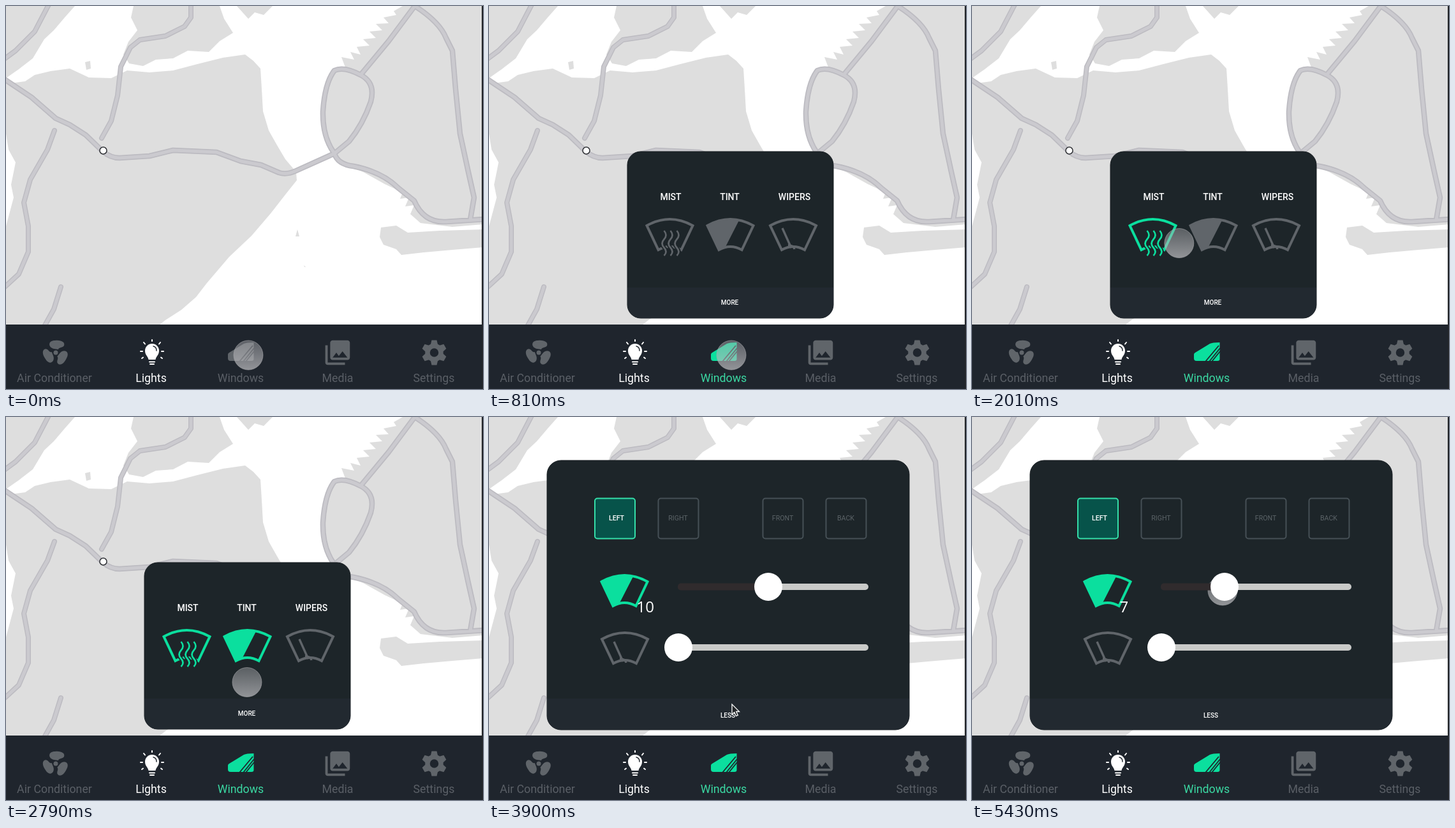
Recreate the animation shown at these times as an HTML page. Size 748 by 600 pixels, loop 5.46 s.

```html
<!DOCTYPE html>
<html lang="en">
<head>
<meta charset="utf-8">
<title>Car controls</title>
<style>
  html, body { margin: 0; width: 100%; height: 100%; overflow: hidden; background: #fff; }
  svg { display: block; width: 748px; height: 600px; font-family: Roboto, sans-serif; }
  text { text-anchor: middle; fill: #fff; }
  .line { fill: none; stroke: currentColor; stroke-width: 4; }
  .icon { color: #60656a; fill: currentColor; }
  .icon.on { color: #0bdf9e; }
  .nav text { font-size: 17.8px; fill: #5a5f66; }
  .nav .lit { fill: #fff; }
  .nav .on + text { fill: #3bd9a3; }
  .card { fill: #1d2529; stroke: #161c20; }
  .foot { fill: #222930; }
  .title { font-size: 14px; font-weight: 500; }
  .small { font-size: 10px; font-weight: 500; }
  .key text { font-size: 10.6px; fill: #5c6468; }
  .key rect { fill: none; stroke: #465056; stroke-width: 2; }
  .key.lit text { fill: #fff; font-weight: 500; }
  .key.lit rect { fill: #07534a; stroke: #35dfa9; }
  .street { fill: none; stroke: #fff; stroke-width: 2.6; stroke-linejoin: round; }
  .road { fill: none; stroke-linejoin: round; stroke-linecap: round; }
</style>
</head>
<body>
<svg viewBox="0 0 748 600">
  <defs>
    <g id="land">
      <path d="M0,0H108L92,18 75,38 60,52 42,82 20,99 0,113Z"/>
      <path d="M0,122L30,118 45,108 70,102 100,98 130,112 165,113 190,101 225,104 262,101 300,91 340,81 375,76 388,86 399,98 401,130 403,165 412,195 425,218 438,240 455,260 456,273 440,293 415,325 385,360 350,393 315,434 298,456 275,476 250,492 240,500H0V345L12,300 8,280 15,245 4,225 0,200Z"/>
      <path d="M200,0H335L342,20 356,42 335,55 318,72 285,70 262,82 235,84 215,94 193,90 184,76 192,56 206,38 196,18Z"/>
      <path d="M362,0H418L404,14 390,10 380,20Z"/>
      <path d="M748,0H622L608,8 612,14 592,18 600,27 580,28 590,38 570,40 580,50 560,52 570,62 550,64 556,76 540,72 546,84 526,80 532,96 512,102 499,128 494,165 499,205 512,230 528,248 560,260 594,279 622,292 618,302 632,300 626,314 640,312 634,326 650,340 700,346 748,342Z"/>
      <path d="M588,347L612,344 630,355 680,352 748,350V378L700,382 655,386 620,390 612,381 592,374 586,362Z"/>
      <path d="M457,350l3,11h-6zM467,406l3,3h-2zM124,88l8,-2 1,12 -7,2z"/>
    </g>
    <clipPath id="shore"><use href="#land"/></clipPath>
    <clipPath id="east"><path d="M560,104L630,14 748,0V332L690,332 655,322 640,300 610,278 548,246 530,230 565,180 578,135Z"/></clipPath>
    <clipPath id="loop"><path d="M515,226Q490,180 500,130L515,102 548,108 572,125 568,160 540,205Z"/></clipPath>

    <path id="glass" class="line" d="M-36,-14Q0,-34 36,-14L18,24Q0,14 -18,24Z"/>
    <g id="tint"><use href="#glass"/><path d="M-36,-14Q-12,-28 14,-23L-7,18 -18,24Z"/></g>
    <g id="wiper"><use href="#glass"/><path class="line" style="stroke-width:3.4" d="M-17,-10L-3,21M-8,17Q1,17 2,23"/></g>
    <path id="steam" d="M-9,-6q6,7 0,13.5t0,13 0,12.5m10,-39q6,7 0,13.5t0,13 0,12.5m10,-39q6,7 0,13.5t0,13 0,12.5"/>
    <g id="mist"><use href="#glass"/><use href="#steam" fill="none" stroke="#1d2529" stroke-width="6"/><use href="#steam" fill="none" stroke="currentColor" stroke-width="2.6"/></g>
    <path id="blade" d="M-3,-6C-12,-8 -13,-19 -1,-19C9,-20 15,-16 13,-11C11,-7 5,-9 4,-5Z"/>
    <path id="tooth" d="M-6,-11L-4,-19.5H4L6,-11Z"/>
    <linearGradient id="shade" x2="0" y2="1">
      <stop stop-color="#b0b0b4" stop-opacity=".42"/><stop offset="1" stop-color="#c0c0c3" stop-opacity=".72"/>
    </linearGradient>
  </defs>

  <!-- map -->
  <rect width="748" height="500" fill="#fff"/>
  <use href="#land" fill="#dedede"/>
  <g clip-path="url(#shore)">
    <path fill="#d3d3d5" d="M345,100l25,-8 12,14 -18,12zM225,20l40,-12 8,18 -40,12zM300,40l30,-10 20,14 -36,12zM195,365l22,-8 -3,8zM240,365l25,-20 5,10 -22,15z"/>
    <g class="street" stroke-width="5">
      <path d="M0,205L16,232 8,270 14,300 0,330M78,290L70,305 62,312 72,325 60,338 74,352 62,372 48,380 55,392 28,408 0,412" style="stroke-width:5"/>
      <path d="M0,30L35,14 60,0M0,55L40,40 65,12M18,0L30,28 35,65M210,20L240,40M230,0L245,30 275,22"/>
    </g>
    <g class="street">
      <path d="M70,104L64,118 45,128M165,114L185,125 225,135 265,120 300,108 345,118 388,130M168,160L215,175 255,160 295,150 340,160 385,142M175,190L215,200 255,195 300,205 345,195 380,183 402,200M100,120L106,150 100,182M130,112L126,150 138,175M60,125L95,150 160,158"/>
      <path d="M205,104L190,150 188,232M225,103L215,150 205,234M262,100L268,140 250,165 255,226M285,95L282,150 278,225M300,88L305,130 295,180 300,226M330,82L325,125 340,160 318,200 322,227M375,88L386,110 365,130 345,118 350,150 362,180 365,243M388,110L382,150 380,183 395,220 420,252"/>
      <path d="M205,118L300,122M190,142L250,148 325,138M195,175L235,182 295,180 360,178M195,210L250,212 320,215 385,220M235,105L228,130M246,163L232,228M340,160L345,195 335,228M265,165L268,196M320,105L355,103 384,96M360,205L400,232 440,242M322,150l14,-6 -4,18 -14,8Z"/>
      <path d="M105,190L100,235 112,262M45,250L100,246 148,236M70,225L100,235M188,238L190,282M215,238L218,275M245,232L240,278M188,254L250,250M188,268L245,266M150,235L142,270 100,302 94,430M142,270L155,300 190,290 240,278 285,265 325,250 365,243M155,300L150,325 170,345 190,325 205,300 190,290"/>
      <path d="M100,332L150,350 170,383 240,375 228,330 240,278M170,383L150,420 95,430M285,265L292,305 280,345 240,375M325,250L310,270 288,280M325,250L350,275 310,318 270,350 240,378 218,412 220,440M70,250L100,302M0,255L40,262 95,248M45,300L78,278 120,285"/>
      <path d="M368,244L375,275 400,270 420,285 438,272M345,242L350,275 375,290 402,310M375,275L362,300 385,315M385,250L390,275M405,252L412,275 440,265M375,290L400,285 425,296M365,260L395,262 430,268M335,262L365,265"/>
      <path d="M436,287L375,338 330,385 285,430 215,490M405,292L350,340 300,390 250,435 195,475M292,305L345,340 385,356M310,318L300,345 340,385M270,350L320,392M280,340L335,375M240,378L300,425M220,410L285,452M250,385L225,425 262,465M350,340L320,320M300,390L275,370"/>
      <path d="M94,430L115,380 155,350M115,380L150,420 160,465 200,500M95,430L60,405 25,418 0,438M95,430L110,460 118,500M95,430L55,440 20,470 0,485M0,455L30,480 35,500M55,440L75,475 110,460 160,465M25,418L55,440M150,420L200,430 250,435M170,383L195,410 220,410M160,465L140,500M200,430L195,475 240,500"/>
      <path d="M615,362L748,352M615,376L748,368M630,358V376M655,357V375M680,356V372M705,352V370M728,350V368"/>
      <path id="loopGrid" clip-path="url(#loop)"/>
      <path id="eastGrid" clip-path="url(#east)"/>
      <path d="M654,20L600,120 548,228M640,60L700,110 748,165M575,150L640,205 722,245M560,245L650,150 748,45M640,300L690,200 745,110M668,332L690,245 660,155" style="stroke-width:3.4"/>
    </g>
  </g>
  <path id="highway" class="road" stroke="#bcbbc1" stroke-width="8.5" d="M-5,113L40,143 78,176 100,186 125,202 152,228Q164,238 178,238L225,235 262,226 330,229 368,243 400,249 428,261Q440,265 455,258L515,231Q496,205 497,165Q500,120 515,101Q530,94 556,108Q580,120 572,150Q560,185 538,212L515,231Q520,248 545,251Q590,260 615,285L640,305Q655,340 690,338L750,334M556,108L600,55 641,0Q680,25 690,50L700,70 705,130 712,200 725,260 734,300 728,335"/>
  <path id="byway" class="road" stroke="#bcbbc1" stroke-width="8" d="M76,195L65,225 38,272 28,308 35,345 35,385 20,420 -4,442M150,207L165,180 175,140 180,95 195,65 210,53 250,47 280,32 290,18V-4M68,-4L45,40 15,70 -4,84M86,440L75,475 60,502"/>
  <g id="cores"></g>
  <circle cx="152.500" cy="226.500" r="5.500" fill="#fff" stroke="#303236" stroke-width="1.500"/>

  <!-- compact panel -->
  <g id="compact">
    <rect class="card" x="217" y="228" width="323" height="261" rx="21"/>
    <path class="foot" d="M217,441H540V468a21,21 0 0 1 -21,21H238a21,21 0 0 1 -21,-21Z"/>
    <text class="title" x="285" y="304">MIST</text>
    <text class="title" x="377.500" y="304">TINT</text>
    <text class="title" x="479" y="304">WIPERS</text>
    <use id="mistIcon" class="icon" href="#mist" x="283.500" y="358"/>
    <use id="tintIcon" class="icon" href="#tint" x="378.500" y="358"/>
    <use class="icon" href="#wiper" x="477" y="358"/>
    <text class="small" x="377.500" y="467.500">MORE</text>
  </g>

  <!-- expanded panel -->
  <g id="full">
    <rect class="card" x="91" y="68" width="568" height="422" rx="22"/>
    <path class="foot" d="M91,441H659V468a22,22 0 0 1 -22,22H113a22,22 0 0 1 -22,-22Z"/>
    <g id="keys"></g>
    <use class="icon on" href="#tint" x="212.500" y="272"/>
    <use class="icon" href="#wiper" x="213" y="362"/>
    <text class="small" x="374.500" y="470.500">LESS</text>
  </g>

  <!-- navigation bar -->
  <rect y="499" width="748" height="101" fill="#1f252d"/>
  <g class="nav">
    <g class="icon" transform="translate(78 543)">
      <use href="#blade"/><use href="#blade" transform="rotate(120)"/><use href="#blade" transform="rotate(240)"/><circle r="3.500"/>
    </g>
    <text x="76" y="588.500">Air Conditioner</text>
    <g fill="#fff" stroke="#fff" stroke-width="2" stroke-linecap="round">
      <path stroke="none" d="M218,540a11,11 0 1 1 22,0C240,547 235,549 234.500,554H223.500C223,549 218,547 218,540Z"/>
      <path d="M225,557.500H233M226,561H232M229,523v2M216,527l2,2.500M242,527l-2,2.500M211,541h3M244,541h3M213,552l2,-1.500M245,552l-2,-1.500"/>
      <path fill="none" stroke="#1f252d" stroke-width="1.500" d="M231,533q5,1 5,7"/>
    </g>
    <text class="lit" x="227.500" y="588.500">Lights</text>
    <g id="windowIcon" class="icon">
      <path d="M348,546Q348,544 350,543L373,529Q377,527 388.500,527V553Q388.500,556 385,556H352Q348,556 348,552Z"/>
      <path fill="none" stroke="#1f252d" stroke-width="1.800" d="M366,557L387,532M372,557L389,536M376,557L389,541"/>
    </g>
    <text x="368" y="588.500">Windows</text>
    <path class="icon" transform="translate(496.800 519.800) scale(1.930)" d="M22,16V4c0,-1.100 -.9,-2 -2,-2H8c-1.100,0 -2,.9 -2,2v12c0,1.100 .9,2 2,2h12c1.100,0 2,-.9 2,-2zM11,12l2,2.700L16,11l4,5H8zM2,6v14c0,1.100 .9,2 2,2h14v-2H4V6z"/>
    <text x="520" y="588.500">Media</text>
    <g id="gear" class="icon" transform="translate(671.500 543)"><circle r="10.500" fill="none" stroke="currentColor" stroke-width="7.500"/></g>
    <text x="671" y="588.500">Settings</text>
  </g>
  <rect x="746" width="2" height="600" fill="#222529"/>

  <circle id="touch" r="23" fill="url(#shade)" stroke="#a8a8ac" stroke-opacity=".6"/>

  <g id="tintSlider">
    <rect x="297" y="261" width="298" height="10" rx="5" fill="#c9cac8"/>
    <rect id="done" x="296" y="260.500" height="11" rx="5" fill="#302b2d"/>
    <circle id="thumb" cy="266" r="22" fill="#fff"/>
    <text id="level" x="231.500" y="305.500" style="text-anchor:start;font:24px 'Open Sans',sans-serif"></text>
  </g>
  <g id="wiperSlider">
    <rect x="297" y="356" width="298" height="10" rx="5" fill="#c9cac8"/>
    <circle cx="297" cy="361" r="22" fill="#fff"/>
  </g>
  <path id="arrow" d="M0,0V16L3.800,12.600 6.500,18.500 9.300,17.200 6.700,11.500H11.500Z" fill="#25282b" stroke="#fff" stroke-width="1.300"/>
</svg>
<script>
const LOOP = 5460;
const $ = id => document.getElementById(id);
const set = (id, attrs) => { for (const k in attrs) $(id).setAttribute(k, attrs[k]); };
const ramp = (t, a, b) => Math.min(1, Math.max(0, (t - a) / (b - a)));
const smooth = p => p * p * (3 - 2 * p);
const backOut = p => 1 + 2.70158 * (p - 1) ** 3 + 1.70158 * (p - 1) ** 2;

// Street grid of two crossing line families around a centre
function grid(cx, cy, angle, gapA, gapB, reach) {
  const ux = Math.cos(angle), uy = Math.sin(angle);
  const family = (gap, dx, dy) => {
    let d = '';
    for (let o = -reach; o <= reach; o += gap) {
      const x = cx - dy * o, y = cy + dx * o;
      d += `M${x - dx * reach},${y - dy * reach}L${x + dx * reach},${y + dy * reach}`;
    }
    return d;
  };
  return family(gapA, ux, uy) + family(gapB, -uy, ux);
}
set('loopGrid', { d: grid(535, 160, .35, 23, 14, 90) });
set('eastGrid', { d: grid(650, 180, .56, 25, 19, 230) });

for (const id of ['highway', 'byway']) {
  const core = $(id).cloneNode();
  core.removeAttribute('id');
  core.setAttribute('stroke', '#cbcacf');
  core.setAttribute('stroke-width', 5);
  $('cores').append(core);
}
$('keys').innerHTML = [['LEFT', 166], ['RIGHT', 265.5], ['FRONT', 429.5], ['BACK', 528.5]].map(([name, x], i) =>
  `<g class="key ${i ? '' : 'lit'}"><rect x="${x}" y="127.500" width="63" height="63" rx="4"/>
   <text x="${x + (i ? 31 : 34)}" y="162">${name}</text></g>`).join('');
for (let a = 0; a < 360; a += 60)
  $('gear').insertAdjacentHTML('beforeend', `<use href="#tooth" transform="rotate(${a})"/>`);

// Pointer stops: time, x, y
const stops = [
  [0, 380, 547], [1170, 380, 547], [1320, 305, 375], [1920, 305, 375], [2190, 380, 362],
  [2640, 380, 362], [2940, 376, 468], [4080, 376, 468], [4560, 435, 272], [4860, 435, 272], [5430, 393, 272],
];
function pointer(t) {
  let i = 1;
  while (i < stops.length - 1 && t > stops[i][0]) i++;
  const [a, x, y] = stops[i - 1], [b, u, v] = stops[i];
  const p = smooth(ramp(t, a, b));
  return [x + (u - x) * p, y + (v - y) * p];
}

function pose(id, cx, cy, p, opacity) {
  const b = backOut(p), scale = .63 + .37 * b, dy = (1 - b) * (b < 1 ? 168 : 105);
  set(id, {
    transform: `translate(${cx} ${cy + dy}) scale(${scale}) translate(${-cx} ${-cy})`,
    opacity,
  });
}

function draw(t) {
  const open = ramp(t, 60, 319), grow = ramp(t, 3285, 3544);
  pose('compact', 378.5, 358.5, open, Math.min(1, open * 3.3) * (1 - ramp(t, 3180, 3285)));
  pose('full', 375, 279, grow, Math.min(1, grow * 3.3));

  $('windowIcon').classList.toggle('on', t >= 90);
  $('mistIcon').classList.toggle('on', t >= 1800);
  $('tintIcon').classList.toggle('on', t >= 2400);

  const [x, y] = pointer(t);
  const isArrow = t >= 3660 && t < 4560;
  set('touch', { cx: x, cy: y, opacity: isArrow ? 0 : 1 });
  set('arrow', { transform: `translate(${x + 5} ${y - 18})`, opacity: isArrow ? 1 : 0 });

  const knob = t > 4560 ? x + 3 : 438;
  set('thumb', { cx: knob });
  set('done', { width: knob - 296 });
  $('level').textContent = Math.round((knob - 297) / 14.1);
  set('tintSlider', { opacity: ramp(t, 3325, 3450) });
  set('wiperSlider', {
    opacity: ramp(t, 3280, 3390),
    transform: `translate(0 ${-5 * (1 - ramp(t, 3360, 3480))})`,
  });
}

const start = performance.now();
function tick() {
  draw((performance.now() - start) % LOOP);
  requestAnimationFrame(tick);
}
tick();
</script>
</body>
</html>
```
